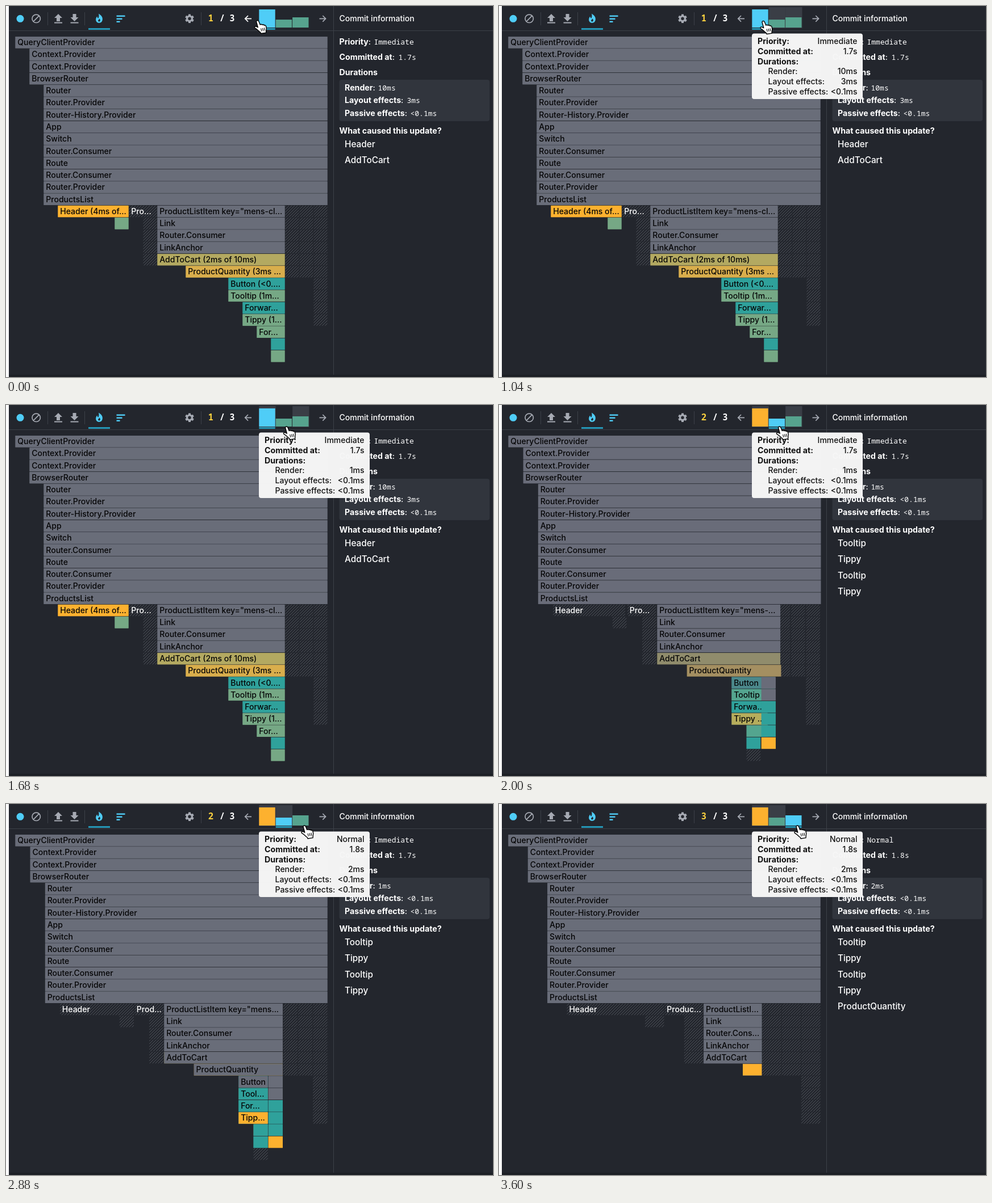
Recreate the animation shown at these times as an HTML page with a canvas. Size 857x654 px, loop 3.68 s.

```html
<!DOCTYPE html>
<html lang="en">
<head>
<meta charset="utf-8">
<title>Profiler flame chart</title>
<style>
  html, body { margin: 0; width: 100%; height: 100%; overflow: hidden; background: #fff; }
  canvas { display: block; }
</style>
</head>
<body>
<canvas id="stage" width="857" height="654"></canvas>
<script>
const ctx = document.getElementById('stage').getContext('2d');
const LOOP = 3680, FADE = 250;
const CLICKS = [0, 1880, 3190];
const COUNTS = [22, 21, 16]; // columns of the chart in each commit

const BG = '#23262d', LINE = '#3c4048', ICON = '#a6aab3', BLUE = '#4fcdf7', UNDERLINE = '#2597b6';
const GRAY = '#696d79', ORANGE = '#fdb12f', KHAKI = '#b3a961', GOLD = '#d9ae4c',
  TEAL = '#2fa19b', GREEN = '#76a885', HATCH = 'hatch';

const SANS = '500 14px Inter, sans-serif', BOLD = '700 14.2px Inter, sans-serif';
const LARGE = '500 15.3px Inter, sans-serif';
const MONO = '500 13px "Noto Sans Mono", monospace', COUNTER = '600 15.5px "Noto Sans Mono", monospace';

const COMMITS = [
  { priority: 'Immediate', at: '1.7s', times: ['10ms', '3ms', '<0.1ms'], causes: ['Header', 'AddToCart'] },
  { priority: 'Immediate', at: '1.7s', times: ['1ms', '<0.1ms', '<0.1ms'], causes: ['Tooltip', 'Tippy', 'Tooltip', 'Tippy'] },
  { priority: 'Normal', at: '1.8s', times: ['2ms', '<0.1ms', '<0.1ms'],
    causes: ['Tooltip', 'Tippy', 'Tooltip', 'Tippy', 'ProductQuantity'] },
];
const PHASES = ['Render', 'Layout effects', 'Passive effects'];

// Each node has one [column, width, colour] span per commit.
const nodes = [];
const add = (row, label, spans, timing) => nodes.push({ row, label, spans, timing });
const same = (...span) => [span, span, span];

for (let row = 14; row < 24; row++) {
  for (let k = 3; k > 0; k--)
    if (row < 20 || k === 1) add(row, '', COUNTS.map(n => [n - k, 1, HATCH]));
  if (row > 14 && row < 19) add(row, '', same(9, 1, HATCH));
}
['QueryClientProvider', 'Context.Provider', 'Context.Provider', 'BrowserRouter', 'Router',
  'Router.Provider', 'Router-History.Provider', 'App', 'Switch', 'Router.Consumer', 'Route',
  'Router.Consumer', 'Router.Provider', 'ProductsList'].forEach((name, row) => {
  const x = row && (row < 4 ? 1 : 2);
  add(row, name, COUNTS.map(n => [x, n - x, GRAY]));
});
add(14, 'Header', [[3, 5, ORANGE], [3, 5, HATCH], [3, 5, HATCH]], '4ms');
add(15, '', [[7, 1, GREEN], [7, 1, HATCH], [7, 1, HATCH]]);
add(14, 'ProductListItem', same(8, 2, HATCH));
['ProductListItem key="mens-clothing"', 'Link', 'Router.Consumer', 'LinkAnchor'].forEach((name, i) =>
  add(14 + i, name, [[10, 9, GRAY], [10, 8, GRAY], [10, 3, GRAY]]));
add(18, 'AddToCart', [[10, 9, KHAKI], [10, 8, GRAY], [10, 3, GRAY]], '2ms');
add(19, 'ProductQuantity', [[12, 7, GOLD], [12, 6, GRAY], [12, 1, ORANGE]], '3ms');
add(20, 'Button', [[15, 4, TEAL], [15, 2, GRAY]], '<0.1ms');
add(21, 'Tooltip', [[15, 4, GREEN], [15, 2, TEAL]], '1ms');
add(22, 'ForwardRef', [[16, 3, TEAL], [15, 2, TEAL]], '<0.1ms');
add(23, 'Tippy', [[16, 3, GREEN], [15, 2, ORANGE]], '1ms');
add(24, 'ForwardRef', [[17, 2, GREEN], [16, 1, TEAL]], '1ms');
add(25, '', [[18, 1, TEAL], [16, 1, TEAL]]);
add(26, '', [[18, 1, GREEN], [16, 1, HATCH]]);
[GRAY, GRAY, TEAL, TEAL, TEAL, ORANGE].forEach((color, i) => add(20 + i, '', [null, [17, 1, color]]));

const hatch = (() => {
  const tile = document.createElement('canvas');
  tile.width = tile.height = 5;
  const c = tile.getContext('2d');
  c.strokeStyle = '#50545c';
  for (const d of [-5, 0, 5]) {
    c.moveTo(d - 1, 6);
    c.lineTo(d + 6, -1);
  }
  c.stroke();
  return ctx.createPattern(tile, 'repeat');
})();

function rect(x, y, w, h, color) {
  ctx.fillStyle = color;
  ctx.fillRect(x, y, w, h);
}

function rounded(x, y, w, h, r, color) {
  ctx.fillStyle = color;
  ctx.beginPath();
  ctx.roundRect(x, y, w, h, r);
  ctx.fill();
}

function text(str, x, middle, font = SANS, color = '#fff', align = 'left') {
  ctx.font = font;
  ctx.fillStyle = color;
  ctx.textAlign = align;
  ctx.fillText(str, x, middle + 5);
}

function stroke(path, color, width) {
  ctx.strokeStyle = color;
  ctx.lineWidth = width;
  ctx.stroke(new Path2D(path));
}

function fill(path, color) {
  ctx.fillStyle = color;
  ctx.fill(new Path2D(path));
}

function ellipsize(str, width) {
  ctx.font = SANS;
  if (ctx.measureText(str).width <= width) return str;
  while (str && ctx.measureText(str + '...').width > width) str = str.slice(0, -1);
  return str + '...';
}

const smooth = p => p * p * (3 - 2 * p);
const ramp = (t, start, end) => smooth(Math.min(1, Math.max(0, (t - start) / (end - start))));

function cursorAt(t) {
  const enter = ramp(t, 120, 400), second = ramp(t, 1240, 1520), third = ramp(t, 2480, 2760);
  return [437 + 22.5 * enter + 28.5 * second + 31.5 * third, 24.5 + enter + 11.5 * second];
}

function drawChart(selected, progress) {
  const unitOf = commit => 550 / COUNTS[commit];
  const before = Math.max(0, selected - 1);
  ctx.save();
  ctx.beginPath();
  ctx.rect(5, 44, 561.5, 606);
  ctx.clip();
  for (const { row, label, spans, timing } of nodes) {
    const span = spans[selected];
    if (!span) continue;
    const old = spans[before] || span;
    const [column, units, color] = span;
    const x = 16.5 + column * unitOf(selected), y = 54.1 + row * 21.27;
    const target = units * unitOf(selected);
    const start = spans[before] ? old[1] * unitOf(before) : target;
    const width = start + (target - start) * progress;
    const dim = color === HATCH;
    if (dim) {
      rect(x, y, width - 1, 20.3, hatch);
    } else {
      rect(x, y, width - 1, 20.3, old[2] === HATCH ? color : old[2]);
      ctx.globalAlpha = progress;
      rect(x, y, width - 1, 20.3, color);
      ctx.globalAlpha = 1;
    }
    if (label && target > 40) {
      const timed = timing && color !== GRAY && !dim;
      const full = timed ? `${label} (${timing} of ${COMMITS[selected].times[0]})` : label;
      text(ellipsize(full, width - 8), x + 3.8, y + 10, SANS, dim ? '#fff' : '#050506');
    }
  }
  ctx.restore();
}

function drawGear(x, y) {
  ctx.save();
  ctx.translate(x, y);
  ctx.strokeStyle = ICON;
  ctx.lineWidth = 3.4;
  ctx.beginPath();
  ctx.arc(0, 0, 4.4, 0, 7);
  ctx.stroke();
  for (let i = 0; i < 6; i++) {
    ctx.rotate(Math.PI / 3);
    rect(-2, -7.8, 4, 3, ICON);
  }
  ctx.restore();
}

function drawToolbar(selected, hovered, t) {
  rounded(18.5, 15.8, 13, 13, 6.5, BLUE);
  stroke('M46 22.3a7.2 7.2 0 1 0 14.4 0a7.2 7.2 0 1 0-14.4 0M48.2 27.4L58.2 17.2', ICON, 1.7);
  for (const x of [73, 138, 343]) rect(x, 11, 1, 23, LINE);
  fill('M92 14l7 7h-4v6h-6v-6h-4zM85 28.5h14v2h-14z', ICON);
  fill('M117.5 14h6v6h4l-7 7-7-7h4zM113.5 28.5h14v2h-14z', ICON);
  fill('M163 13.5c5 3 8 7 6.5 12c-1 3-3 4.3-5.5 4.3c-4 0-6.3-3-5.8-6.8c.3-2 1.3-3.5 2.4-4.7' +
    'c0 2 .5 3 1.7 3.4c1.4-2.3 1.6-5 .7-8.2z', BLUE);
  fill('M164.3 22c2 2 2.2 5-.2 5.6c-2.4-.3-2.6-2.6-1-3.6c.9-.5 1.2-1 1.2-2z', BG);
  rect(145, 39, 38, 3, UNDERLINE);
  [15, 10, 6].forEach((w, i) => rect(194.5, 16.5 + i * 5, w, 2.4, BLUE));
  drawGear(323, 22.3);
  text(selected + 1, 360.5, 22, COUNTER, '#fbd13f', 'center');
  text('/', 380.5, 22, COUNTER, '#fff', 'center');
  text('3', 398, 22, COUNTER, '#fff', 'center');
  stroke('M432 22.3h-11M426 17l-5.3 5.3 5.3 5.3', hovered < 0 ? '#fff' : ICON, 1.7);
  stroke('M551.5 22.3h11M557.3 17l5.3 5.3-5.3 5.3', ICON, 1.7);

  [6, 24, 20].forEach((top, i) => {
    const x = 445.3 + i * 29.4;
    if (t >= 800 && i !== hovered) rect(x, 2, 29.4, 37, '#3a3e46');
    rect(x, top, 28.4, 38 - top, i === selected ? BLUE : i ? '#56a38e' : ORANGE);
    if (i === selected) rect(x, 39, 28.4, 3, UNDERLINE);
  });
}

function drawSidebar({ priority, at, times, causes }) {
  const entry = (label, value, x, valueX, y) => {
    text(label, x, y, BOLD);
    const width = ctx.measureText(label).width;
    text(':', x + width, y);
    text(value, valueX, y, MONO);
  };
  text('Commit information', 586.5, 22);
  entry('Priority', priority, 586.5, 647.5, 62.5);
  entry('Committed at', at, 586.5, 690.5, 89.5);
  text('Durations', 586.5, 116.5, BOLD);
  rounded(586.5, 130, 264.5, 73, 4, '#31353d');
  PHASES.forEach((phase, i) => entry(phase, times[i], 596, [654.5, 705.5, 711.5][i], 144 + i * 22.4));
  text('What caused this update?', 586.5, 220, BOLD);
  causes.forEach((cause, i) => text(cause, 596, 244 + i * 28.3, LARGE));
}

function drawTooltip({ priority, at, times }) {
  const ink = '#111';
  const entry = (label, value, y, indent) => {
    text(label + ':', indent ? 473.5 : 455, y, indent ? SANS : BOLD, ink);
    text(value, 630.5, y, SANS, ink, 'right');
  };
  rounded(445, 48.5, 195, 115.5, 4, 'rgba(246,246,246,.98)');
  entry('Priority', priority, 62);
  entry('Committed at', at, 79.8);
  entry('Durations', '', 97.6);
  PHASES.forEach((phase, i) => entry(phase, times[i], 115.4 + i * 17.8, true));
}

function drawCursor(x, y) {
  ctx.save();
  ctx.translate(x, y);
  ctx.lineJoin = 'round';
  const hand = 'M3.5 3C3.5.5 7 .3 7.8 2.6L10.2 8.6C11 7.3 13.3 7.5 13.8 8.8C14.8 7.8 16.8 8.2 17.2 9.5' +
    'C18.5 8.9 20.2 9.6 20.6 11.3C21.3 14 21.8 16 20.8 18.4L20.5 22.6L11.5 24L10.8 22' +
    'C8 20.3 6 18 4.3 16.4L1 14.3C-.5 12.5 1.2 11 3.2 11.6L6.3 13.2z';
  fill(hand, '#fff');
  stroke(hand, '#000', 1.4);
  stroke('M11.6 14.8l1.2 5M14.6 14.3l1 5M17.5 13.8l.8 5', '#000', 1.1);
  ctx.restore();
}

function draw(t) {
  const selected = CLICKS.filter(c => t >= c).length - 1;
  const progress = selected ? ramp(t, CLICKS[selected], CLICKS[selected] + FADE) : 1;
  const [x, y] = cursorAt(t);
  const hovered = Math.floor((x + 5 - 445) / 29.4);

  rect(0, 0, 857, 654, '#fff');
  rect(5, 0, 852, 654, BG);
  rect(5, 43, 852, 1, LINE);
  rect(576, 0, 1, 650, LINE);
  rect(5, 650, 852, 4, '#1c1f25');
  drawToolbar(selected, hovered, t);
  drawChart(selected, progress);
  drawSidebar(COMMITS[selected]);
  if (hovered >= 0) drawTooltip(COMMITS[hovered]);
  drawCursor(x, y);
}

function tick() {
  draw(performance.now() % LOOP);
  requestAnimationFrame(tick);
}
tick();
</script>
</body>
</html>
```
